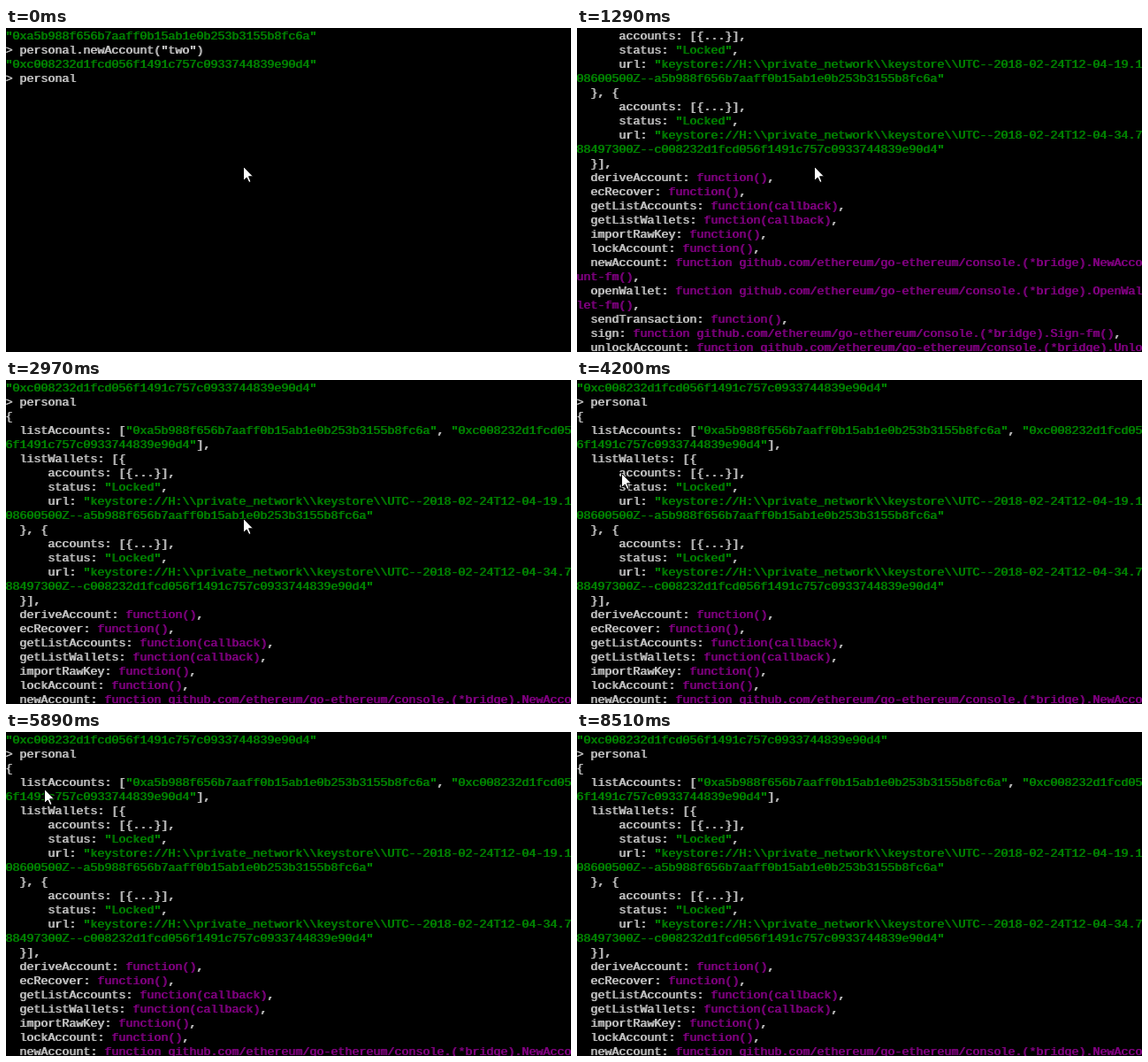
An HTML page with a canvas that plays this animation: 639 by 366 pixels, repeating every 9060 ms.

```html
<!DOCTYPE html>
<html lang="en">
<head>
<meta charset="utf-8">
<title>Console</title>
<style>
html, body { margin: 0; width: 100%; height: 100%; overflow: hidden; background: #000; }
canvas { display: block; }
</style>
</head>
<body>
<canvas id="stage" width="639" height="366"></canvas>
<script>
const ctx = document.getElementById('stage').getContext('2d');
const LOOP = 9060, COLS = 80, ROWS = 23, CELL = 8, LINE = 16;
const GREY = '#c0c0c0', GREEN = '#008000', PURPLE = '#800080';

const one = 'a5b988f656b7aaff0b15ab1e0b253b3155b8fc6a';
const two = 'c008232d1fcd056f1491c757c0933744839e90d4';
const wallet = (time, hash) => String.raw`      accounts: [{...}],
      status: "Locked",
      url: "keystore://H:\\private_network\\keystore\\UTC--2018-02-24T12-04-${time}00Z--${hash}"`;
const plain = (name, args = '') => `  ${name}: function(${args}),`;
const bridge = (name, method) =>
  `  ${name}: function github.com/ethereum/go-ethereum/console.(*bridge).${method}-fm()`;

const text = [
  `"0x${one}"`,
  '> personal.newAccount("two")',
  `"0x${two}"`,
  '> personal',
  '{',
  `  listAccounts: ["0x${one}", "0x${two}"],`,
  '  listWallets: [{',
  wallet('19.1086005', one),
  '  }, {',
  wallet('34.7884973', two),
  '  }],',
  plain('deriveAccount'),
  plain('ecRecover'),
  plain('getListAccounts', 'callback'),
  plain('getListWallets', 'callback'),
  plain('importRawKey'),
  plain('lockAccount'),
  bridge('newAccount', 'NewAccount') + ',',
  bridge('openWallet', 'OpenWallet') + ',',
  plain('sendTransaction'),
  bridge('sign', 'Sign') + ',',
  bridge('unlockAccount', 'UnlockAccount'),
  '}',
  '> '
].join('\n').split('\n');

// Colour each character, then wrap at the console width
function wrap(line) {
  const cells = [...line].map(ch => [ch, GREY]);
  if (line[0] !== '>') {
    for (const m of line.matchAll(/"[^"]*"|function.*\)/g)) {
      const color = m[0][0] === '"' ? GREEN : PURPLE;
      for (let i = 0; i < m[0].length; i++) cells[m.index + i][1] = color;
    }
  }
  const rows = [];
  for (let i = 0; i < cells.length; i += COLS) rows.push(cells.slice(i, i + COLS));
  return rows;
}
const rows = text.flatMap(wrap);

// Once the output has printed, each wheel notch scrolls back three rows
const PRINTED = 120, wheel = [1290, 1850, 2970];
const topRow = t => t < PRINTED ? 0 : 11 - 3 * wheel.filter(w => w <= t).length;

// The mouse jumps at a steady rate along straight stretches: [jump, x, y]
const MOVE = 3542, JUMP = 138;
const path = [
  [0, 268, 156], [4, 50, 105], [9, 102, 125], [14, 36, 61], [17, 43, 64],
  [19, 20, 80], [24, 173, 123], [28, 29, 175], [32, 249, 231], [36, 650, 400]
];

function mouseAt(t) {
  const last = path[path.length - 1][0];
  const jump = Math.min(last, Math.max(0, Math.floor((t - MOVE) / JUMP)));
  const next = Math.max(1, path.findIndex(p => p[0] >= jump));
  const [j0, x0, y0] = path[next - 1], [j1, x1, y1] = path[next];
  const k = (jump - j0) / (j1 - j0);
  return [Math.round(x0 + (x1 - x0) * k), Math.round(y0 + (y1 - y0) * k)];
}

const arrow = new Path2D('M.5 .5V16.5L4.2 13L6.8 18.5L9 17.6L6.6 11.8H11.5Z');

function drawMouse([x, y]) {
  ctx.save();
  ctx.translate(x, y);
  ctx.fillStyle = '#fff';
  ctx.strokeStyle = '#000';
  ctx.fill(arrow);
  ctx.stroke(arrow);
  ctx.restore();
}

// Two passes a pixel apart give thick stems and thin bars
function drawCell(ch, color, x, y) {
  ctx.fillStyle = color;
  ctx.fillText(ch, x - 1, y);
  ctx.fillText(ch, x, y);
}

function draw(t) {
  const top = topRow(t);
  const end = t < PRINTED ? 4 : top + ROWS;
  ctx.fillStyle = '#000';
  ctx.fillRect(0, 0, 639, 366);
  ctx.font = '13.333px "Liberation Mono", monospace';
  rows.slice(top, end).forEach((row, r) => row.forEach(([ch, color], c) => {
    if (ch !== ' ') drawCell(ch, color, c * CELL, r * LINE + 13);
  }));
  if (t >= 1140 && t < wheel[0]) {
    ctx.fillStyle = GREY;
    ctx.fillRect(2 * CELL, 364, CELL, 2);
  }
  drawMouse(mouseAt(t));
}

const start = performance.now();
function tick() {
  draw((performance.now() - start) % LOOP);
  requestAnimationFrame(tick);
}
tick();
</script>
</body>
</html>
```
